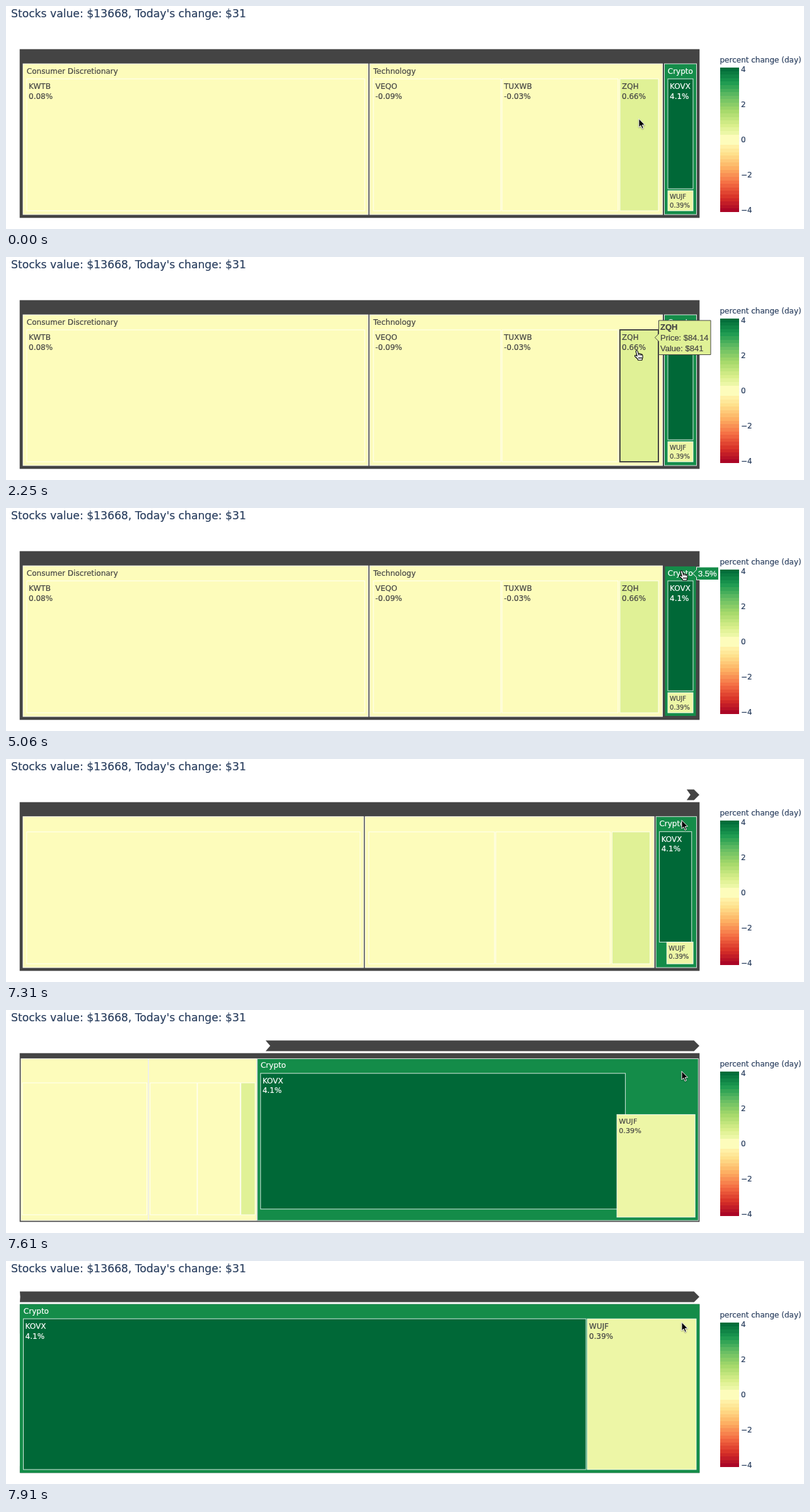
Write an HTML page with a canvas that moves like this. It is 1266 px wide and 355 px high and loops after 8000 ms.

```html
<!DOCTYPE html>
<html lang="en">
<head>
<meta charset="utf-8">
<title>Stocks treemap</title>
<style>
html, body { margin: 0; width: 100%; height: 100%; overflow: hidden; background: #fff; }
canvas { display: block; }
</style>
</head>
<body>
<canvas id="stage" width="1266" height="355"></canvas>
<script>
const ctx = document.getElementById('stage').getContext('2d');
const LOOP = 8000;
const DARK = '#444444', INK = '#2a3f5f', PALE = '#fdfcbb', LIME = '#e0f196',
      SOFT = '#edf6a6', GREEN = '#148c49', DEEP = '#006837', EDGE = 'rgba(255,255,255,.85)';
const SANS = '"DejaVu Sans", Verdana, sans-serif';
const ARIAL = '"Liberation Sans", Arial, sans-serif';
const SCALE = ['a50026', 'd73027', 'f46d43', 'fdae61', 'fee08b', 'ffffbf',
               'd9ef8b', 'a6d96a', '66bd63', '1a9850', '006837'];

const LEFT = 22, RIGHT = 1100, TOP = 69, BOTTOM = 337;
// Boxes are [left, top, right, bottom].
const SECTORS = [
  { name: 'Consumer Discretionary', box: [27, 92, 574.5, 332] },
  { name: 'Technology', box: [577, 92, 1041.5, 332] }
];
const LEAVES = [
  { name: 'KWTB', change: '0.08%', box: [33, 116, 569, 326], fill: PALE },
  { name: 'VEQO', change: '-0.09%', box: [583, 116, 785, 326], fill: PALE },
  { name: 'TUXWB', change: '-0.03%', box: [787, 116, 971, 326], fill: PALE },
  { name: 'ZQH', change: '0.66%', box: [974, 116, 1035, 326], fill: LIME }
];
const CRYPTO = [[1044.5, 92, 1095.5, 332], [LEFT, TOP, RIGHT, BOTTOM]];
const KOVX = [[1050, 116, 1090, 291], [27, 92, 920, 332]];
const WUJF = [[1050, 294, 1090, 326], [922, 92, 1095, 332]];

// Pointer stops: time, left, top of the hand.
const HAND = [
  [600, 998, 160], [750, 998, 149], [2250, 996, 148], [2400, 996, 145],
  [2550, 997, 143], [2690, 1009, 147], [2840, 1030, 154], [2980, 1072, 167],
  [3130, 1079, 172], [3280, 1075, 171], [3430, 1072, 171], [4480, 1066, 153],
  [4630, 1066, 143], [4770, 1066, 125], [4920, 1067, 103], [5060, 1067, 99]
];
const ZOOM_SHOWN = 7310, ZOOM_START = 7198.7, ZOOM_TIME = 750, ZOOM_STEP = 150;

const mix = (a, b, p) => a + (b - a) * p;
const mixBox = ([a, b], p) => a.map((v, i) => mix(v, b[i], p));
const cubicInOut = u => u < 0.5 ? 4 * u ** 3 : 1 - 4 * (1 - u) ** 3;

function text(str, x, y, color, size = 12, family = SANS, weight = '') {
  ctx.font = `${weight} ${size}px ${family}`;
  ctx.fillStyle = ctx.strokeStyle = color;
  ctx.lineWidth = 0.2;
  ctx.fillText(str, x, y);
  ctx.strokeText(str, x, y);
}

function box([l, t, r, b], fill, stroke = EDGE, width = 1) {
  ctx.fillStyle = fill;
  ctx.fillRect(l, t, r - l, b - t);
  ctx.strokeStyle = stroke;
  ctx.lineWidth = width;
  ctx.strokeRect(l, t, r - l, b - t);
}

function polygon(points, fill, stroke, width = 1) {
  ctx.beginPath();
  points.forEach(([x, y]) => ctx.lineTo(x, y));
  ctx.closePath();
  ctx.fillStyle = fill;
  ctx.fill();
  if (!stroke) return;
  ctx.strokeStyle = stroke;
  ctx.lineWidth = width;
  ctx.stroke();
}

function leafText(name, change, [l, t], color, size = 12) {
  const k = size / 12;
  text(name, l + 3, t + 16 * k, color, size);
  text(change, l + 3, t + 31.5 * k, color, size);
}

function scaleColor(u) {
  const at = Math.min(Math.max(u, 0), 1) * 10, i = Math.min(Math.floor(at), 9);
  const channel = (hex, k) => parseInt(hex.slice(k, k + 2), 16);
  const rgb = [0, 2, 4].map(k => Math.round(mix(channel(SCALE[i], k), channel(SCALE[i + 1], k), at - i)));
  return `rgb(${rgb})`;
}

function colorbar() {
  const bands = 41, top = 98, height = 230;
  for (let i = 0; i < bands; i++) {
    const y = Math.round(top + height * i / bands);
    const end = Math.round(top + height * (i + 1) / bands);
    const nearZero = Math.abs(i - 20) < 2;
    ctx.fillStyle = nearZero ? PALE : scaleColor(1 - (i + 0.5) / bands);
    ctx.fillRect(1133, y, 30, end - y);
  }
  text('percent change (day)', 1132.5, 90, INK);
  ['4', '2', '0', '−2', '−4'].forEach((s, i) => text(s, 1166, 105 + 56 * i, INK));
}

function tooltip([l, t, r, b], lines, fill, ink, edge) {
  const mid = (t + b) / 2;
  polygon([[l - 6, mid], [l, mid - 6], [l, t], [r, t], [r, b], [l, b], [l, mid + 6]], fill, edge);
  lines.forEach((s, i) => {
    const bold = i === 0 && lines.length > 1 ? 'bold' : '';
    text(s, l + 2.5, t + 15 + 17 * i, ink, 13, ARIAL, bold);
  });
}

function arrow(x, y) {
  ctx.save();
  ctx.translate(x, y);
  ctx.shadowColor = 'rgba(0,0,0,.3)';
  ctx.shadowBlur = 2;
  ctx.shadowOffsetY = 1;
  polygon([[0, 0], [0, 13.5], [3, 10.7], [5.2, 15.8], [7.4, 14.8], [5.3, 9.9], [9.5, 9.7]], '#000', '#fff');
  ctx.restore();
}

function hand(x, y) {
  ctx.save();
  ctx.translate(x, y);
  ctx.lineJoin = 'round';
  const outline = new Path2D('M5.2 9.5 L3.4 3 Q3 1 4.4 .8 Q5.7 .6 6.2 2.3 L7.3 6 ' +
    'Q8.4 5 9.6 6.3 Q10.8 5.5 11.8 6.9 Q13.6 6.6 14 8.6 L14.2 11.5 L13 16.2 L6.8 16.2 ' +
    'L5.8 14 L2 10.5 Q1 9 2.2 8.4 Q3.4 8 5.2 9.8 Z');
  ctx.fillStyle = '#fff';
  ctx.fill(outline);
  ctx.strokeStyle = '#000';
  ctx.lineWidth = 1.1;
  ctx.stroke(outline);
  ctx.stroke(new Path2D('M7.3 6 L7.9 8.5 M9.7 6.5 L10.2 8.8 M11.9 7 L12.2 9 M8 11.3 V14 M10 11.3 V14 M12 11.3 V14'));
  ctx.restore();
}

function pathbar(p) {
  const notch = mix(RIGHT, LEFT, p), corner = Math.max(LEFT, 1094 - 1080 * p);
  polygon([[corner, 48.5], [1091.5, 48.5], [RIGHT, 57], [1091.5, 65.5], [corner, 65.5], [notch, 57]], DARK);
}

function treemap(p, zooming, hover) {
  ctx.fillStyle = DARK;
  ctx.fillRect(LEFT - 0.3, TOP - 0.3, RIGHT - LEFT + 0.6, BOTTOM - TOP + 0.6);

  for (const { name, box: from } of SECTORS) {
    box(mixBox([from, [LEFT, TOP, LEFT, BOTTOM]], p), PALE);
    if (!zooming) text(name, from[0] + 5.8, 107.5, DARK);
  }
  for (const { name, change, box: from, fill } of LEAVES) {
    const to = [LEFT, from[1], LEFT, from[3]];
    const lit = hover === name;
    box(mixBox([from, to], p), fill, lit ? DARK : EDGE, lit ? 2 : 1);
    if (!zooming) leafText(name, change, from, DARK);
  }

  const crypto = mixBox(CRYPTO, p), kovx = mixBox(KOVX, p), wujf = mixBox(WUJF, p);
  const edge = key => hover === key ? [DARK, 2] : [EDGE, 1];
  if (p > 0.99) {
    ctx.fillStyle = GREEN;
    ctx.fillRect(LEFT, TOP - 0.3, RIGHT - LEFT + 0.3, BOTTOM - TOP + 0.6);
  } else {
    box(crypto, GREEN, ...edge('Crypto'));
  }
  text('Crypto', crypto[0] + 5.3, mix(107.5, 83.5, p), '#fff');
  box(kovx, DEEP, ...edge('KOVX'));
  leafText('KOVX', '4.1%', kovx, '#fff');
  box(wujf, SOFT);
  leafText('WUJF', '0.39%', wujf, DARK, mix(10.1, 12, p));
}

function hoverAt(t) {
  if (t < 600 || t >= ZOOM_SHOWN) return '';
  return t < 2980 ? 'ZQH' : t < 4920 ? 'KOVX' : 'Crypto';
}

function draw(t) {
  const zooming = t >= ZOOM_SHOWN;
  const shown = ZOOM_SHOWN + Math.floor((t - ZOOM_SHOWN) / ZOOM_STEP) * ZOOM_STEP;
  const p = zooming ? cubicInOut((shown - ZOOM_START) / ZOOM_TIME) : 0;
  const hover = hoverAt(t);

  ctx.fillStyle = '#fff';
  ctx.fillRect(0, 0, 1266, 355);
  text("Stocks value: $13668, Today's change: $31", 8, 18, INK, 17.2);
  treemap(p, zooming, hover);
  if (zooming) pathbar(p);
  colorbar();

  if (hover === 'ZQH') {
    tooltip([1035.5, 101, 1118, 155.5], ['ZQH', 'Price: $84.14', 'Value: $841'], LIME, DARK, DARK);
  } else if (hover === 'KOVX') {
    tooltip([1089.5, 101, 1171.5, 155.5], ['KOVX', 'Price: $19.15', 'Value: $574'], DEEP, '#fff', '#fff');
  } else if (hover === 'Crypto') {
    tooltip([1095.5, 94, 1130.5, 114.5], ['3.5%'], GREEN, '#fff', '#fff');
  }

  if (t < HAND[0][0]) arrow(1004, 179.5);
  else if (zooming) arrow(1072, 97.5);
  else {
    const [, x, y] = HAND.filter(stop => stop[0] <= t).pop();
    hand(x, y);
  }
}

function tick() {
  draw(performance.now() % LOOP);
  requestAnimationFrame(tick);
}
tick();
</script>
</body>
</html>
```
